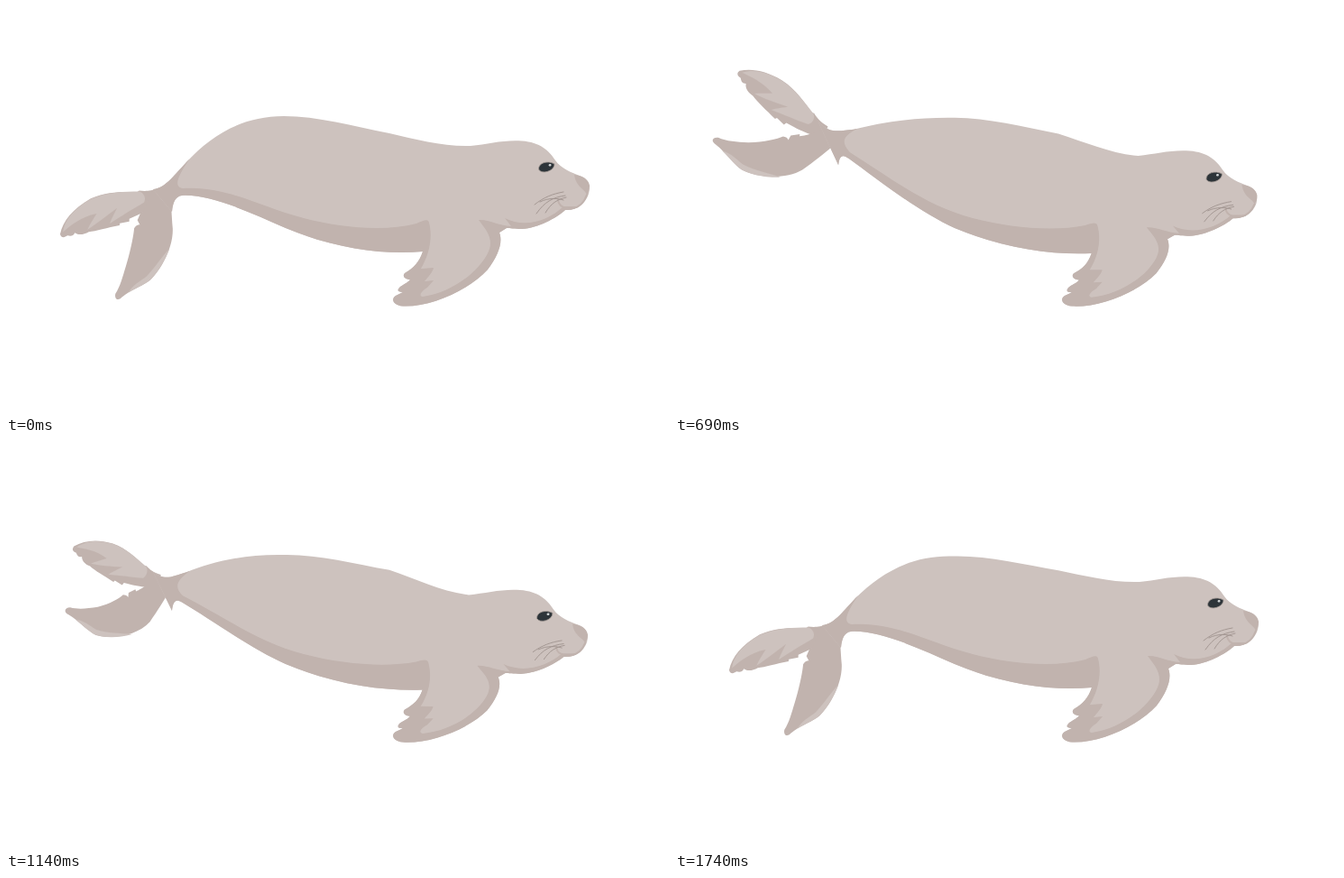
Write an HTML page that moves like this. It is 735x452 px and loops after 1.8 s.

```html
<!DOCTYPE html>
<html lang="en">
<head>
<meta charset="utf-8">
<title>Swimming seal</title>
<style>
  html, body { margin: 0; width: 100%; height: 100%; overflow: hidden; background: #fff; }
  svg { display: block; width: 100vw; height: 100vh; }
  .light { fill: #cdc2be; }
  .dark { fill: #c1b3ae; }
  .line { fill: none; stroke: #a0948f; stroke-width: .9; stroke-linecap: round; }
</style>
</head>
<body>
<svg viewBox="0 0 735 452">
  <clipPath id="clip"><path id="clipBody"/></clipPath>
  <path id="upper" class="dark"/>
  <path id="upperLight" class="light"/>
  <path id="lower" class="dark"/>
  <path id="lowerLight" class="light"/>
  <path id="body" class="light"/>
  <path id="shade" class="dark" clip-path="url(#clip)"/>
  <path id="nose" class="dark"/>
  <path id="lip" class="line" style="stroke:#c1b3ae;stroke-width:2"/>
  <path id="whiskers" class="line"/>
  <path id="eye" fill="#2d3439" stroke="#a59b96" stroke-width=".8"/>
  <path id="glint" fill="#cfd3d5"/>
</svg>
<script>
const LOOP = 1800, STEP = 30, LAST = 1740, PEAK = 830;

// The seal at rest, tail down.
const outline = `M163,203 C176,202 184,190 200,173 C228,143 262,122 308,122
  C345,122 385,133 425,141 C455,148 485,156 515,155 C535,153 552,148 572,149.5
  C592,151 602,160 609,171 C615,180 628,185 636,188 C646,191 648,199 646,208
  C642,220 632,227 620,226 C610,235 590,246 572,247 C564,247 558,246 555,246
  L547,251 C551,262 546,276 534,292 C513,315 470,334 440,332.5 C428,331 427,324 432,321
  L440,317 C434,317 433,315 437,311 C443,307 446,306 448,303
  C442,303 439,299 442,296 C452,290 458,284 462,272
  C418,276 365,269 310,246 C270,228 225,208 195,210 C188,211 185,217 184,228Z`;
const shade = `M660,222 L618,222 C600,239 574,246 553,235 L560,244
  C545,243 535,236 524,237 C532,248 542,258 534,274 C522,297 492,318 462,322
  C456,321 462,315 467,312 L474,304 L464,305 C468,300 473,295 474,290 L460,291
  C470,274 473,255 469,240 C468,235 462,238 455,241 C420,250 372,246 330,235
  C280,222 245,199 196,202 C185,200 191,188 203,170 L203,0 L0,0 L0,600 L660,600Z`;
const face = {
  nose: 'M630,187 C639,188 646,192 647,199 C647,203 646,206 644,209 C642,203 632,201 630,187Z',
  lip: 'M612,214 C612,222 620,225 628,224 C636,223 641,217 644,209',
  whiskers: `M586,220 C596,212 606,208 618,206 M588,230 C597,217 606,212 620,210
    M598,229 C604,219 611,214 621,212 M592,217 C602,212 612,213 618,215`,
  eye: 'M590.5,181 C590,174 600,170.5 608,175 C608,183 594,187 590.5,181Z',
  glint: 'M601.5,176 C602,174.5 604.5,174.5 604.5,176 C604.5,178 601.5,178 601.5,176Z'
};

// Flipper shapes: percent along the spine, distance to its side.
const fins = {
  upper: `M-3,4 C5,4 8,5 13,8 L15,7 C25,12 38,19 55,19 C75,18 90,12 101,2
    C103,-3 99,-4 95,-4 C92,-7 90,-8 86,-6 C84,-11 78,-13 72,-13 C65,-16 52,-18 40,-21
    L39,-19 L30,-21 L29,-18 C18,-17 12,-16 6,-14 L-5,-11Z`,
  upperLight: `M13,7 C25,12 38,18.5 55,18.5 C75,17.5 88,12 97,2 C86,3 72,6 56,1
    C62,-3 68,-7 72,-10 C60,-9 50,-6 36,-2 C42,-8 46,-12 48,-15 C36,-12 22,-9 12,-6
    C9,-2 10,4 13,7Z`,
  lower: `M-2,13 L5,15 C12,16 16,18 20,19 L19,21 L29,23 L33,19 C33,22 36,23 38,24
    C45,22 60,18 75,14 C85,10 92,6 99,5 C103,2 102,-3 98,-3 C88,-6 85,-11 74,-17
    C62,-22 42,-24 28,-17 C18,-13 8,-11 0,-9Z`,
  lowerLight: `M45,-20.5 C58,-21 68,-20 76,-16 C84,-11 88,-7 92,-5.5
    C84,-4 80,-8 74,-11 C64,-15 55,-15 45,-20.5Z`
};

const clamp = (v, max = 1) => Math.max(0, Math.min(max, v));
const smooth = u => u * u * (3 - 2 * u);

const warp = (d, move) => d.replace(/(-?[\d.]+),(-?[\d.]+)/g,
  (_, x, y) => move(+x, +y).map(v => v.toFixed(2)).join());

// The hip lifts, the head nods and the back slowly settles.
const bodyMove = (lift, push, nod, settle) => (x, y) => {
  const hip = clamp((260 - x) / 95, 1.1) ** 1.5;
  const head = nod * smooth(clamp((x - 425) / 95)) * clamp(1 - (y - 200) / 150);
  const back = y < 160 ? settle * clamp(1 - Math.abs(x - 308) / 160) : 0;
  return [x - push * hip - head * .14, y - lift * hip + head + back];
};

// Bends a flipper along a curve from its base.
function finMove(ax, ay, degrees, length, bend, reach) {
  const a = degrees * Math.PI / 180, cos = Math.cos(a), sin = Math.sin(a);
  const cx = ax - cos * length, cy = ay + sin * length;
  const bx = ax + (cx - ax) * reach - sin * bend, by = ay + (cy - ay) * reach - cos * bend;
  return (percent, side) => {
    const s = percent / 100, r = 1 - s;
    const dx = r * (bx - ax) + s * (cx - bx), dy = r * (by - ay) + s * (cy - by);
    const k = side / Math.hypot(dx, dy);
    return [r * r * ax + 2 * r * s * bx + s * s * cx - dy * k,
            r * r * ay + 2 * r * s * by + s * s * cy + dx * k];
  };
}

const setPath = (id, d) => document.getElementById(id).setAttribute('d', d);

function draw(t) {
  const rising = t < PEAK;
  const p = rising ? t / PEAK : (LAST - t) / (LAST - PEAK);
  const arc = Math.sin(Math.PI * p);
  const push = rising ? arc * 8 : 0;
  const squash = rising ? 1 : 1 - .15 * arc;
  const nod = 14.5 * Math.min(1, t / 900, (LAST - t) / 600);

  const move = bodyMove(87 * p, push, nod, 4.5 * t / LAST);
  const body = warp(outline, move);
  setPath('body', body);
  setPath('clipBody', body);
  setPath('shade', warp(shade, move));
  for (const id in face) setPath(id, warp(face[id], move));

  const upper = finMove(167 - push * .75, 207 - 87 * p, 24 - 53 * p - 19 * p * p,
    (115 - 5 * p) * squash, 10 * (1 - p) ** 3, .6);
  const lower = finMove(173 - push, 208 - 72 * p, 67 - 80 * p,
    125 * squash, -22 - 14 * p - 16 * arc, .46);
  for (const id in fins) setPath(id, warp(fins[id], id.startsWith('upper') ? upper : lower));
}

const begin = performance.now();
function tick() {
  const t = (performance.now() - begin) % LOOP;
  draw(Math.min(LAST, Math.floor(t / STEP) * STEP));
  requestAnimationFrame(tick);
}
tick();
</script>
</body>
</html>
```
